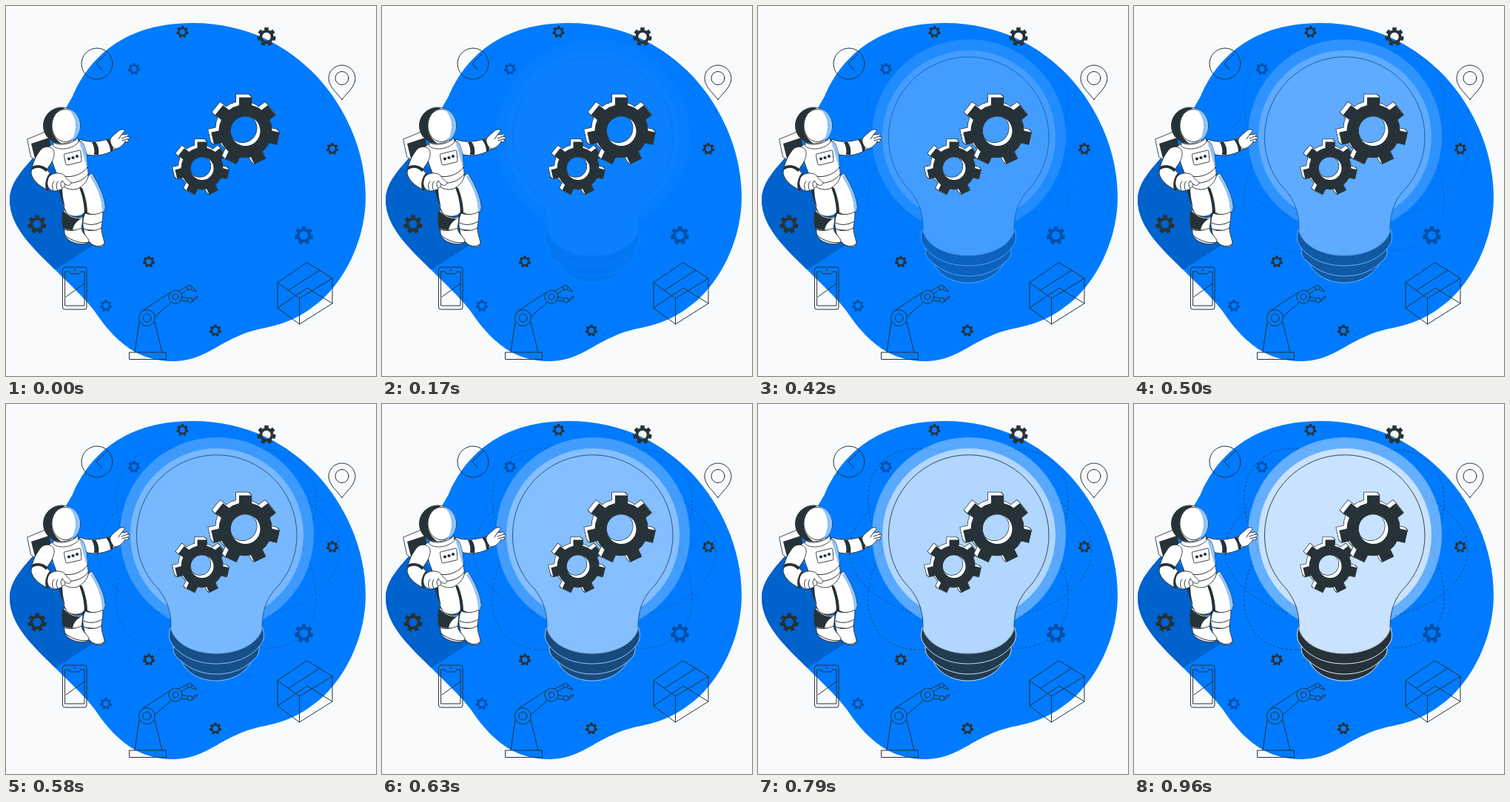
Animation of 500x500 px, one loop 1 s. Source, as an HTML page:

```html
<!DOCTYPE html>
<html lang="en">
<head>
<meta charset="utf-8">
<title>Bright idea</title>
<style>
html, body { margin: 0; width: 100%; height: 100%; overflow: hidden; background: #f8fafc; }
svg { display: block; width: 100vw; height: 100vh; }
.line { fill: none; stroke: #263238; stroke-width: 1; stroke-linejoin: round; stroke-linecap: round; }
.suit { fill: #fff; stroke: #263238; stroke-width: .9; stroke-linejoin: round; stroke-linecap: round; }
.dark { fill: #263238; }
.tint { fill: #8fc4ff; }
.ring { fill: #263238; stroke: #fff; stroke-width: .9; }
.orbit { fill: none; stroke: #263238; stroke-width: .7; stroke-dasharray: 3 3; }
</style>
</head>
<body>
<svg viewBox="0 0 500 500">
  <defs>
    <path id="blob" d="M252 23C327 23 382 55 420 95C458 136 486 195 486 258C486 310 463 362 430 394C408 414 385 428 350 435C290 446 275 480 225 480C180 480 150 455 125 420C112 400 92 382 66 356C40 330 5 300 5 262C5 235 30 215 45 195C65 165 80 140 90 122C108 80 150 23 252 23Z"/>
    <clipPath id="inside"><use href="#blob"/></clipPath>
  </defs>
  <use href="#blob" fill="#007bff"/>
  <path clip-path="url(#inside)" fill="#0062cc" d="M0 195L38 192L70 225L120 322L66 357L0 370Z"/>

  <g id="bulb">
    <ellipse class="orbit" cx="284" cy="195" rx="165" ry="96" transform="rotate(45 284 195)"/>
    <ellipse class="orbit" cx="284" cy="197" rx="165" ry="96" transform="rotate(-45 284 197)"/>
    <ellipse class="orbit" cx="287" cy="198" rx="164" ry="96"/>
    <circle cx="285" cy="176" r="131" fill="#fff" fill-opacity=".4"/>
    <circle cx="285" cy="177" r="117" fill="#cce4ff"/>
    <path class="ring" d="M236 345C244 366 266 374 284 374C302 374 324 366 333 345Z"/>
    <path class="ring" d="M227 325C224 333 228 341 235 346C250 360 268 365 284 365C302 365 320 360 334 346C341 341 344 333 341 325Z"/>
    <path class="ring" d="M223 300C220 308 219 317 224 324C238 344 262 351 284 351C307 351 331 344 345 324C350 317 349 308 346 300Z"/>
    <path fill="#cce4ff" stroke="#263238" stroke-width=".9" d="M223 303C223 285 221 270 206 250C188 232 176.500 207 176.500 177A108.250 108.250 0 0 1 393 177C393 207 381 232 364 250C349 267 346 285 346 303C341 325 312 337 284 337C256 337 228 325 223 303Z"/>
    <path fill="none" stroke="#fff" stroke-width=".9" d="M223 303C228 325 256 337 284 337C312 337 341 325 346 303"/>
  </g>

  <g id="gears"></g>

  <g class="line">
    <circle cx="123" cy="78" r="21"/>
    <path d="M135 65L122 78L130 87"/>
    <path d="M454 126.500C448 118 436 109 436 98A18 18 0 0 1 472 98C472 109 460 118 454 126.500Z"/>
    <circle cx="454" cy="97.500" r="9"/>
    <rect x="76.500" y="353" width="32.500" height="57" rx="3"/>
    <path d="M80 359H85L87 362H99L101 359H106V405H80ZM81 393L106 375"/>
    <circle cx="93" cy="356.500" r=".9"/>
    <path d="M407 347L441 368V402L396.500 430L367 408V374ZM367 374L396.500 395L441 368M396.500 395V430M382 384L424 357M367 408L407 381L441 402"/>
    <path d="M167 468H216.500V477.500H167ZM180 427L174 468M201 427L211 468"/>
    <circle cx="190.500" cy="421.500" r="11"/>
    <circle cx="190.500" cy="421.500" r="5.500"/>
    <path d="M184 412L222 387M201 420L224 400"/>
    <circle cx="229" cy="393" r="9"/>
    <circle cx="229" cy="393" r="4"/>
    <path d="M233 385L245 379M237 389L246 383M238 393L245 395M236 398L245 399"/>
    <circle cx="248" cy="380.500" r="3.300"/>
    <circle cx="248.500" cy="397.500" r="3.300"/>
    <path d="M251 379L258 386L251 384M252 396L259 392L258 395L251 400"/>
  </g>

  <g id="astronaut">
    <path class="suit" d="M29 180L53 170L58 178L60 197L38 207L34 204Z"/>
    <path class="dark" d="M34 186L58 178L62 196L39 206Z"/>
    <!-- far arm -->
    <path class="suit" d="M99 180C111 185 125 184 141 179L147 194C134 202 119 204 107 200Z"/>
    <path class="dark" d="M116 184L121 183.500C125 189 126 195 125 201L119 201C120 195 119 189 116 184ZM135 181L139 179.500C143 184 145 189 145 195L141 197C141 191 139 185 135 181Z"/>
    <path class="suit" d="M141 180C144 174 150 172 153 168C157 166 161 167 160 169L156 174L164 173C166 174 165 175 164 176L167 177C167 179 166 180 164 180L166 182C165 184 163 184 161 183C158 189 152 193 147 193C143 190 140 184 141 180Z"/>
    <path class="line" d="M156 174L152 180M164 176L156 179M164 180L157 182"/>
    <!-- legs -->
    <path class="suit" d="M97 241L116 226C125 240 133 258 134 271C134 278 130 281 123 282C112 283 106 278 105 268Z"/>
    <path class="tint" d="M116 228C125 241 133 258 133.500 271C133.500 275 132 278 130 279C130 262 124 246 114 231Z"/>
    <path class="dark" d="M97 243L103 246C107 256 110 268 110 280L103 286Z"/>
    <path class="suit" d="M107 280C114 283 124 282 131 278C131 286 130 295 128 304L105 302C103 293 104 286 107 280Z"/>
    <path class="suit" d="M105 301C112 305 122 304 129 300C129 309 133 316 133 321C131 327 122 327 117 323C111 318 105 310 105 301Z"/>
    <path class="line" d="M105 293C112 297 122 296 130 291M111 318C117 325 128 327 133 321"/>
    <path class="suit" d="M78 275C86 284 94 288 104 285L102 303L78 303C75 294 75 283 78 275Z"/>
    <path class="dark" d="M77 276C84 284 92 288 102 287C95 291 91 296 90 303L77 301C75 293 75 284 77 276Z"/>
    <path class="suit" d="M79 302C87 305 95 303 102 300C103 309 113 313 112 319C107 323 97 322 90 319C83 316 78 311 79 302Z"/>
    <path class="line" d="M80 310C88 317 102 322 112 319"/>
    <path class="suit" d="M74 240C83 246 92 246 98 242C103 253 107 270 106 279C102 285 91 286 83 281C77 274 74 255 74 240Z"/>
    <path class="dark" d="M71 243L76 243C76 253 77 262 80 272C75 264 72 253 71 243Z"/>
    <!-- torso -->
    <path class="suit" d="M58 190C68 182 92 179 103 184C110 195 109 207 111 225C113 233 106 242 97 247C87 250 78 246 73 239C67 222 60 207 58 190Z"/>
    <path class="tint" d="M99 184L103 185C110 195 109 207 110.500 225C108 214 105 200 99 184Z"/>
    <path class="line" d="M68 226C82 235 101 230 110 218M72 236C86 243 104 238 111 227"/>
    <path class="suit" d="M64 184C70 190 90 187 97 178L98 184C90 194 70 196 64 189Z"/>
    <path class="suit" d="M79 200L99 195Q101 195 101 197L102 209Q102 211 100 211L83 215Q81 215 80.500 213L78.500 202Z"/>
    <g class="dark"><circle cx="85" cy="206.500" r="2.100"/><circle cx="90.500" cy="205" r="2.100"/><circle cx="96" cy="203" r="2.100"/></g>
    <!-- near arm -->
    <path class="suit" d="M48 193C55 188 63 190 65 197C66 206 60 214 55 221L62 229L55 248C45 243 36 236 34 226C35 213 41 201 48 193Z"/>
    <path class="dark" d="M35 217C42 213 51 215 57 221L54 224C48 218 41 217 34.500 222ZM59 226L63 228C57 234 55 241 58 250L54 248C52 240 54 232 59 226Z"/>
    <path class="suit" d="M61 228C67 225 75 225 79 229C81 233 85 235 88 239C88 243 84 243 80 241C79 246 73 250 65 250C58 249 55 243 56 237C57 232 58 230 61 228Z"/>
    <path class="line" d="M64 249C62 244 62 240 65 237M70 249C67 244 68 240 70 237M76 246C73 242 74 239 76 236L80 241"/>
    <!-- helmet -->
    <ellipse class="suit" cx="75.500" cy="161.500" rx="25" ry="24.500"/>
    <path class="dark" d="M77 137C60 137 50.500 149 50.500 162C50.500 175 60 185 75 186C64 178 60 168 63 155C65 146 70 141 79 139Z"/>
    <ellipse class="suit" cx="80" cy="161.500" rx="18" ry="22"/>
    <path class="tint" d="M84 139C95 142 100 152 100 162C100 172 95 179 88 183C97 168 96 150 84 139Z"/>
  </g>
</svg>
<script>
const DARK = '#263238', NAVY = '#0050a8';
const layer = document.getElementById('gears');

function add(d, attrs) {
  const p = document.createElementNS('http://www.w3.org/2000/svg', 'path');
  p.setAttribute('d', d);
  p.setAttribute('fill-rule', 'evenodd');
  for (const k in attrs) p.setAttribute(k, attrs[k]);
  layer.append(p);
}

// Seven square teeth on a round body with a round hole.
function gear(cx, cy, R, body, hole, w) {
  const base = Math.sqrt(body * body - w * w);
  let d = '';
  for (let i = 0; i < 7; i++) {
    const a = (i * 360 / 7 - 90) * Math.PI / 180;
    const c = Math.cos(a), s = Math.sin(a);
    const at = (x, y) => `${(cx + x * c - y * s).toFixed(2)} ${(cy + x * s + y * c).toFixed(2)}`;
    d += (i ? `A${body} ${body} 0 0 1 ` : 'M') + at(base, -w);
    d += `L${at(R, -w)}L${at(R, w)}L${at(base, w)}`;
    if (i === 6) d += `A${body} ${body} 0 0 1 ${cx - w} ${cy - base}Z`;
  }
  return d + `M${cx - hole} ${cy}a${hole} ${hole} 0 1 0 ${2 * hole} 0a${hole} ${hole} 0 1 0 ${-2 * hole} 0Z`;
}

function solidGear(cx, cy, R, body, hole, w, depth) {
  const copies = [];
  for (let i = 8; i > 0; i--) copies.push(gear(cx - depth * i / 8, cy - depth * i / 8, R, body, hole, w));
  copies.forEach(d => add(d, { fill: DARK, stroke: DARK, 'stroke-width': 1.4 }));
  copies.forEach(d => add(d, { fill: '#fff' }));
  add(gear(cx, cy, R, body, hole, w), { fill: DARK });
}

solidGear(265, 219.5, 36, 28.5, 15.5, 6.5, 3.3);
solidGear(323.5, 169, 45.5, 36, 20, 8.5, 4);

[
  [238.5, 35, 8, DARK], [173, 85, 8, NAVY], [352, 41.5, 12.5, DARK],
  [441, 193, 8, DARK], [42, 295, 12.5, DARK], [193, 345.5, 8, DARK],
  [402.5, 310, 12.5, NAVY], [135, 405, 8, NAVY], [283, 438.5, 8, DARK]
].forEach(([x, y, r, fill]) => add(gear(x, y, r, r * .76, r * .46, r * .22), { fill }));

// The bulb lights up on a sine ease, in 24 steps per second.
const steps = [];
for (let i = 0; i < 24; i++) {
  const t = Math.max(0, i - .6) / 24;
  steps.push({
    offset: Math.round(i * 100 / 24) / 100,
    opacity: (1 - Math.cos(Math.PI * t)) / 2,
    easing: 'steps(1, end)'
  });
}
steps.push({ offset: 1, opacity: 0 });
document.getElementById('bulb').animate(steps, { duration: 1000, iterations: Infinity });
</script>
</body>
</html>
```
